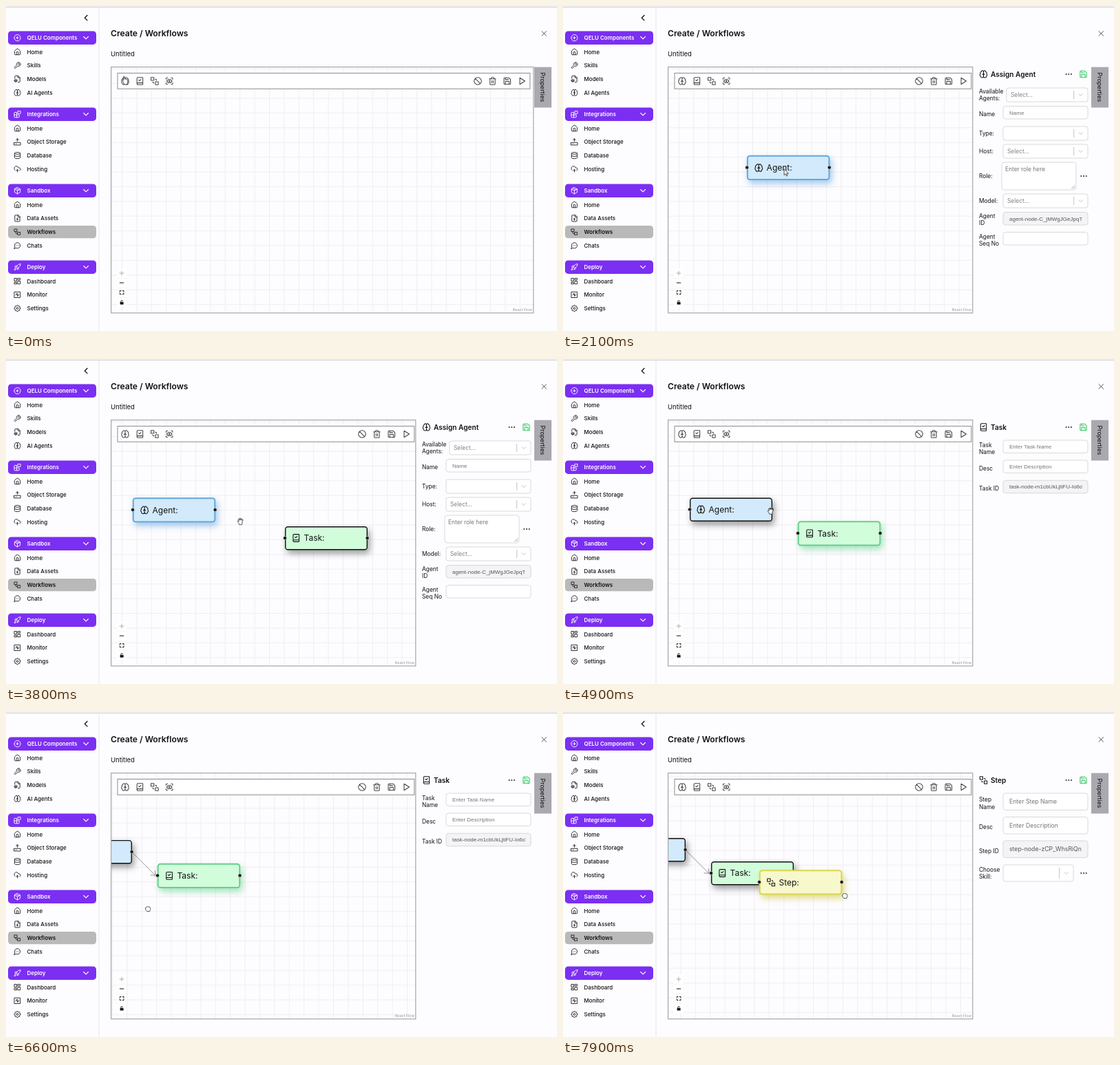
Write an HTML page that moves like this. It is 800 px wide and 472 px high and loops after 8000 ms.

```html
<!DOCTYPE html>
<html lang="en">
<head>
<meta charset="utf-8">
<title>Workflow editor</title>
<style>
html, body { margin: 0; width: 100%; height: 100%; overflow: hidden; background: #fdfcfe; }
svg { display: block; width: 100%; height: 100%; }
text { font-family: Inter, "Open Sans", sans-serif; font-size: 8px; fill: #111; white-space: pre; }
.arial { font-family: "Liberation Sans", Arial, sans-serif; }
.icon { fill: none; stroke-width: 2; stroke-linecap: round; stroke-linejoin: round; }
.field { fill: #fff; stroke: #d0d0d4; stroke-width: .8; }
.field.locked { fill: #f4f4f6; }
.thin { fill: none; stroke: #c4c4c8; stroke-width: 1; }
.cursor path { fill: #fff; stroke: #222; stroke-width: .8; stroke-linejoin: round; }
.edge { fill: none; stroke: #8a8a90; stroke-width: .9; }
.world, .cursor, .agentMove, .taskMove, .stepMove, .wire { animation: 8s ease-in-out infinite; }

.world { animation-name: pan; animation-timing-function: linear; }
@keyframes pan {
  0%, 75% { transform: translate(0, 0); }
  82.5% { transform: translate(-121px, -15.5px); }
  83.75%, 100% { transform: translate(-126px, -18.5px); }
}
.agentMove { animation-name: agentMove; }
@keyframes agentMove {
  0%, 21.25% { transform: translate(405px, 243px); }
  30%, 100% { transform: translate(184px, 201.5px); }
}
.taskMove { animation-name: taskMove; }
@keyframes taskMove {
  0%, 51.25% { transform: translate(405px, 243px); }
  56.25%, 100% { transform: translate(341px, 235.5px); }
}
.stepMove { animation-name: stepMove; }
@keyframes stepMove {
  0%, 97.5% { transform: translate(405px, 243px); }
  98.75%, 100% { transform: translate(411px, 248px); }
}
.wire { animation-name: wire; }
@keyframes wire {
  0%, 62.5% { d: path("M304 219L304 219"); }
  70%, 100% { d: path("M304 219L338 253"); }
}
.cursor { animation-name: cursor; }
@keyframes cursor {
  0%, 8.75% { transform: translate(173px, 108px); }
  18.75%, 21.25% { transform: translate(461px, 267px); }
  30%, 31.25% { transform: translate(240px, 225.5px); }
  35% { transform: translate(199px, 119px); }
  38.75% { transform: translate(199px, 119px); animation-timing-function: ease-in; }
  47.5% { transform: translate(340px, 236px); animation-timing-function: ease-out; }
  50%, 51.25% { transform: translate(432px, 262px); }
  56.25%, 57.5% { transform: translate(368px, 254.5px); }
  61.25%, 62.5% { transform: translate(302px, 221px); }
  70%, 71.25% { transform: translate(339px, 255px); }
  74.5% { transform: translate(327px, 301.5px); }
  75% { transform: translate(327px, 301.5px); animation-timing-function: linear; }
  82.5% { transform: translate(206px, 286px); animation-timing-function: linear; }
  83.75%, 84.5% { transform: translate(201px, 283px); }
  89%, 90.5% { transform: translate(218px, 114px); }
  96.25%, 97.5% { transform: translate(403px, 262px); }
  98.75%, 100% { transform: translate(409px, 267px); }
}
</style>
</head>
<body>
<svg id="stage" viewBox="0 0 800 472"></svg>
<script>
const LOOP = 8000;
const INK = '#222';

const box = (x, y, w, h = w) => `M${x} ${y}h${w}v${h}h${-w}z`;
const ring = (r, x = 12, y = 12) => `M${x - r} ${y}a${r} ${r} 0 1 0 ${2 * r} 0a${r} ${r} 0 1 0 ${-2 * r} 0`;
const gear = () => {
  const points = Array.from({ length: 32 }, (_, i) => {
    const r = i % 4 < 2 ? 10 : 7.6, a = (i - .5) * Math.PI / 16;
    return `${(12 + r * Math.cos(a)).toFixed(1)} ${(12 + r * Math.sin(a)).toFixed(1)}`;
  });
  return `M${points.join('L')}Z${ring(3)}`;
};

const ICONS = {
  plus: ring(10) + 'M8 12h8M12 8v8',
  home: 'M15 21v-8a1 1 0 0 0-1-1h-4a1 1 0 0 0-1 1v8M3 10a2 2 0 0 1 .7-1.5l7-6a2 2 0 0 1 2.6 0l7 6A2 2 0 0 1 21 10v9a2 2 0 0 1-2 2H5a2 2 0 0 1-2-2z',
  wrench: 'M14.7 6.3a1 1 0 0 0 0 1.4l1.6 1.6a1 1 0 0 0 1.4 0l3.8-3.8a6 6 0 0 1-8 8l-6.9 6.9a2.1 2.1 0 0 1-3-3l6.9-6.9a6 6 0 0 1 8-8z',
  model: 'M14 2v6h6M4 10V4a2 2 0 0 1 2-2h9l5 5v13a2 2 0 0 1-2 2h-4M3 15l4-2 4 2v4l-4 2-4-2zM3 15l4 2 4-2M7 17v4',
  brain: 'M12 5a3 3 0 1 0-6 .1 4 4 0 0 0-2.5 5.8 4 4 0 0 0 .5 6.6A4 4 0 1 0 12 18ZM12 5a3 3 0 1 1 6 .1 4 4 0 0 1 2.5 5.8 4 4 0 0 1-.5 6.6A4 4 0 1 1 12 18ZM15 13a4.5 4.5 0 0 1-3-4 4.5 4.5 0 0 1-3 4',
  blocks: 'M10 22V6H4a2 2 0 0 0-2 2v12a2 2 0 0 0 2 2h12a2 2 0 0 0 2-2v-6H2' + box(14, 2, 8),
  upload: 'M16 6l-4-4-4 4M12 2v8M6 18h.01M10 18h.01' + box(2, 14, 20, 8),
  database: 'M3 5a9 3 0 0 0 18 0a9 3 0 0 0-18 0v14a9 3 0 0 0 18 0V5M3 12a9 3 0 0 0 18 0',
  cloud: 'M12 13v8M4 14.9A7 7 0 1 1 15.7 8h1.8a4.5 4.5 0 0 1 2.5 8.2M8 17l4-4 4 4',
  cube: 'M12 2l9 5v10l-9 5-9-5V7zM3 7l9 5 9-5M12 22V12M7.5 4.5l9 5',
  file: 'M15 2H6a2 2 0 0 0-2 2v16a2 2 0 0 0 2 2h12a2 2 0 0 0 2-2V7ZM14 2v6h6M12 12v6M9 15l3-3 3 3',
  flow: box(3, 3, 8) + box(13, 13, 8) + 'M7 11v4a2 2 0 0 0 2 2h4',
  chat: 'M7.9 20A9 9 0 1 0 4 16.1L2 22ZM8 12h.01M12 12h.01M16 12h.01',
  rocket: 'M4.5 16.5c-1.5 1.3-2 5-2 5s3.7-.5 5-2a2 2 0 0 0-3-3zM12 15l-3-3a22 22 0 0 1 2-4A13 13 0 0 1 22 2c0 2.7-.8 7.5-6 11a22 22 0 0 1-4 2zM9 12H4s.5-3 2-4 5 0 5 0M12 15v5s3-.5 4-2 0-5 0-5',
  dashboard: box(3, 3, 7, 9) + box(14, 3, 7, 5) + box(14, 12, 7, 9) + box(3, 16, 7, 5),
  monitor: box(3, 3, 18) + 'M17 12h-2l-2 5-2-10-2 5H7',
  settings: gear(),
  task: 'M4 19.5v-15A2.5 2.5 0 0 1 6.5 2H19a1 1 0 0 1 1 1v18a1 1 0 0 1-1 1H6.5a1 1 0 0 1 0-5H20M9 9.5l2 2 4-4',
  step: box(2, 2, 8) + box(14, 14, 8) + 'M7 14v1a2 2 0 0 0 2 2h1M14 7h1a2 2 0 0 1 2 2v1',
  eye: 'M3 7V5a2 2 0 0 1 2-2h2M17 3h2a2 2 0 0 1 2 2v2M21 17v2a2 2 0 0 1-2 2h-2M7 21H5a2 2 0 0 1-2-2v-2M5 12a7.5 7.5 0 0 1 14 0a7.5 7.5 0 0 1-14 0' + ring(1.5),
  ban: ring(10) + 'M4.9 4.9l14.2 14.2',
  trash: 'M3 6h18M19 6v14a2 2 0 0 1-2 2H7a2 2 0 0 1-2-2V6M8 6V4a2 2 0 0 1 2-2h4a2 2 0 0 1 2 2v2M10 11v6M14 11v6',
  save: 'M16 3l5 5v11a2 2 0 0 1-2 2H5a2 2 0 0 1-2-2V5a2 2 0 0 1 2-2zM17 21v-8H7v8M7 3v5h8',
  play: 'M6 3l14 9-14 9z'
};

const CURSORS = {
  pointer: 'M-3 1.5l-1.6-1.2c-.8-.9.3-1.8 1.1-1.1l1 .8v-5c0-1.3 1.7-1.3 1.7 0v3.2c.4-.7 1.5-.6 1.6.2.5-.6 1.5-.4 1.6.4.6-.4 1.4 0 1.4.8v2.4c0 2-.8 2.4-1.1 4h-4.2c-.3-1.2-1-2.7-1.5-4.5z',
  grab: 'M-3.4 1.6l-1.2-1.8c-.4-1 .8-1.5 1.4-.7l.5.6-.7-3c-.1-1 1.1-1.2 1.4-.3l.4 1.2-.1-1.8c0-1 1.3-1 1.4 0l.2 1.8.4-1.6c.3-.9 1.4-.6 1.3.3l-.2 1.8.5-.8c.5-.8 1.5-.3 1.2.6l-1 3.4-.4 3h-3.9c-.2-1.2-.8-2-1.2-2.7z',
  arrow: 'M-2-4.5v9l2-1.8 1.5 3.2 1.4-.6-1.5-3.1h2.8z',
  fist: 'M-3.4-1c0-1.3 1-1.6 1.5-1.5.2-1 1.5-1.1 1.8-.4.4-.7 1.7-.6 1.9.3 1-.4 1.8.3 1.8 1.2v2c0 1.5-.8 1.8-1 3h-3.8c-.4-1.2-2.2-2-2.2-3.2z'
};

// Times in ms at which each class turns visible, hidden, visible ...
const SHOWN = {
  wide: [0, 1700], narrow: [1700],
  agent: [600, 1700, 4000], agentSel: [1700, 4000],
  task: [3100, 4000, 7800], taskSel: [4000, 7800],
  step: [7250, 7800], stepSel: [7800],
  agentPanel: [1700, 4000], taskPanel: [4000, 7800], stepPanel: [7800],
  link: [5000], tip: [5600],
  pointer: [0, 800, 2600, 3100, 7000, 7350],
  grab: [800, 1400, 2450, 2600, 3100, 3950, 4600, 6000, 6750, 7000, 7350, 7750],
  arrow: [1400, 2450, 3950, 4600],
  fist: [6000, 6750, 7750]
};
const showRules = Object.entries(SHOWN).map(([name, times]) => {
  const keys = times.map((t, i) => `${t / LOOP * 100}%{visibility:${i % 2 ? 'hidden' : 'visible'}}`);
  return `@keyframes ${name}{0%{visibility:hidden}${keys.join('')}}
    .${name}{visibility:hidden;animation:${name} ${LOOP}ms step-end infinite}`;
}).join('');

const icon = (name, x, y, scale = .46, color = INK) =>
  `<path class="icon" stroke="${color}" d="${ICONS[name]}" transform="translate(${x} ${y}) scale(${scale}) translate(-12 -12)"/>`;
const text = (x, y, str, size = 8, weight = 400, fill = '#111', more = '') =>
  `<text x="${x}" y="${y}" style="font-size:${size}px;font-weight:${weight};fill:${fill}" ${more}>${str}</text>`;
const rect = (x, y, x2, y2, attrs) =>
  `<rect x="${x}" y="${y}" width="${x2 - x}" height="${y2 - y}" ${attrs}/>`;
const line = (d, color, width = 1) =>
  `<path d="${d}" fill="none" stroke="${color}" stroke-width="${width}" stroke-linecap="round" stroke-linejoin="round"/>`;
const group = (cls, ...parts) => `<g class="${cls}">${parts.join('')}</g>`;

const MENU = [
  ['plus', 'QELU Components', ['home', 'Home'], ['wrench', 'Skills'], ['model', 'Models'], ['brain', 'AI Agents']],
  ['blocks', 'Integrations', ['home', 'Home'], ['upload', 'Object Storage'], ['database', 'Database'], ['cloud', 'Hosting']],
  ['cube', 'Sandbox', ['home', 'Home'], ['file', 'Data Assets'], ['flow', 'Workflows'], ['chat', 'Chats']],
  ['rocket', 'Deploy', ['dashboard', 'Dashboard'], ['monitor', 'Monitor'], ['settings', 'Settings']]
];
const sidebar = () => line('M135 2V472', '#e6e6ea') + line('M118 13.5l-3.7 3.7 3.7 3.7', '#111', 1.3) +
  MENU.map(([mark, title, ...items], n) => {
    const cy = 46.2 + 111 * n;
    const head = rect(3, cy - 9.7, 131, cy + 9.7, 'rx="4.5" fill="#7b2ff2"') + icon(mark, 16.5, cy, .46, '#fff') +
      text(30.5, cy + 2.9, title, 8, 600, '#fff') + line(`M112.7 ${cy - 1.7}l3.4 3.4 3.4-3.4`, '#fff', 1.1);
    return head + items.map(([name, label], i) => {
      const y = cy + 20.4 + 19.75 * i, on = label === 'Workflows';
      return (on ? rect(3, y - 9.2, 131, y + 9.2, 'rx="4.5" fill="#b9b9ba"') : '') +
        icon(name, 16.5, y) + text(30.5, y + 2.9, label, 8, on ? 600 : 500);
    }).join('');
  }).join('');

const node = (name, mark, label, fill, accent, glow) => {
  const face = (cls, stroke, width, h, shadow, shift) => group(cls,
    rect(.7, .7, 119.3, h, `rx="3.5" fill="${fill}" stroke="${stroke}" stroke-width="${width}" style="filter:drop-shadow(${shadow})"`),
    icon(mark, 16.2 + shift, 17 + shift, .54, '#111'), text(27.6 + shift, 21.3 + shift, label, 12),
    [0, 119.6].map(x => `<circle cx="${x}" cy="${17 + shift / 2}" r="2.5" fill="#111" stroke="#fff" stroke-width=".5"/>`).join(''));
  return group(name + 'Move',
    face(name, '#111', 1.4, 33.8, '3px 5px 5px rgba(0,0,0,.38)', 0),
    face(name + 'Sel', accent, 2, 35, `3px 5px 5px ${glow}`, .9));
};

const dots = (x, y) => [-3.7, 0, 3.7].map(d => `<circle cx="${x + d}" cy="${y}" r="1.05" fill="#333"/>`).join('');
const field = (y, y2, str = '', { x = 639, x2 = 762, locked, arial = true, size = 8 } = {}) =>
  rect(x, y, x2, y2, `rx="3.5" class="field${locked ? ' locked' : ''}"`) +
  text(648, (y + y2) / 2 + 2.9, str, size, 400, locked ? '#555' : '#757575', `clip-path="url(#fieldClip)" ${arial ? 'class="arial"' : ''}`);
const select = (y, y2, str = '', x = 639, x2 = 762) => {
  const cy = (y + y2) / 2;
  return rect(x, y, x2, y2, 'rx="3" class="field"') + text(x + 6, cy + 3, str, 8.4, 400, '#808080') +
    `<path class="thin" d="M${x2 - 20.3} ${y + 4}V${y2 - 4}M${x2 - 13.3} ${cy - 1.5}l3 3 3-3"/>`;
};
const label = (y, ...rows) => rows.map((row, i) => text(604, y + 10.4 * i, row, 8.4)).join('');
const panel = (name, mark, title, ...parts) => group(name + 'Panel',
  icon(mark, 610.5, 99, .52, '#111'), text(621, 102.6, title, 10.1, 600),
  dots(734.3, 99), icon('save', 755.5, 99, .52, '#35c964'), ...parts);

const panels = () =>
  panel('agent', 'brain', 'Assign Agent',
    label(126.6, 'Available', 'Agents:'), select(119, 139, 'Select...', 644),
    label(160, 'Name'), field(145.5, 164, 'Name'),
    label(188, 'Type:'), select(175, 195),
    label(214, 'Host:'), select(201, 221, 'Select...'),
    label(250, 'Role:'), rect(637, 227, 745, 267, 'rx="3.5" class="field"'),
    text(642, 240, 'Enter role here', 8.4, 400, '#757575'),
    line('M738.5 265l4.5-4.5M741 265l2-2', '#888', .7), dots(756, 247),
    label(286, 'Model:'), select(273, 293, 'Select...'),
    label(308, 'Agent', 'ID'), field(299.5, 318, 'agent-node-C_jMWgJGeJpqT', { locked: true }),
    label(337.6, 'Agent', 'Seq No'), field(328.5, 347)) +
  panel('task', 'task', 'Task',
    label(128, 'Task', 'Name'), field(118, 136.5, 'Enter Task Name'),
    label(161.6, 'Desc'), field(147, 165.5, 'Enter Description'),
    label(190.6, 'Task ID'), field(176.3, 194.8, 'task-node-m1cbUkLjtiFU-Io6d', { locked: true })) +
  panel('step', 'step', 'Step',
    label(130.3, 'Step', 'Name'), field(118, 142.5, 'Enter Step Name', { arial: false, size: 8.7 }),
    label(170, 'Desc'), field(152.5, 177, 'Enter Description', { arial: false, size: 8.7 }),
    label(205, 'Step ID'), field(187, 211.5, 'step-node-zCP_WhsRiQn', { locked: true, arial: false, size: 8.7 }),
    label(231.8, 'Choose', 'Skill:'), select(222, 246, '', 639, 741), dots(756, 234));

const frame = (cls, right, barRight) => group(cls,
  cls === 'narrow' ? rect(right, 86, 766.8, 448, 'fill="#fdfcfe"') : '',
  rect(152.6, 88.6, right, 445.8, 'fill="none" stroke="#a6a6aa" stroke-width="1.2"'),
  rect(162, 97.5, barRight, 120.3, 'fill="#fff" stroke="#8c8c90"'),
  ['brain', 'task', 'step', 'eye'].map((n, i) => icon(n, 173 + 21.4 * i, 109, .53, '#444')).join(''),
  ['ban', 'trash', 'save', 'play'].map((n, i) => icon(n, barRight - 75.8 + 21.4 * i, 109, .53, '#444')).join(''),
  text(right - 30, 443, 'React Flow', 5.4, 400, '#999'));

const controls = rect(161.5, 381, 175, 437.5, 'fill="#fff"') +
  line('M162 395.2h13M162 409.3h13M162 423.4h13', '#eee', .6) +
  line('M165 388h6M168 385v6', '#a5a5a5', .9) + line('M165.3 402h5.4', '#111', 1.2) +
  line('M165.3 415v-1.5h1.7M169.3 413.5h1.7v1.5M171 417v1.5h-1.7M167 418.5h-1.7v-1.5', '#111', 1) +
  rect(165.6, 430, 170.6, 433.6, 'rx=".6" fill="#111"') + line('M166.8 430v-1a1.3 1.3 0 0 1 2.6 0', '#111', .9);

document.getElementById('stage').innerHTML = `
<style>${showRules}</style>
<defs>
  <clipPath id="canvasClip"><rect x="153" y="89" width="613" height="356.5"/></clipPath>
  <clipPath id="fieldClip"><rect x="640" y="90" width="113.5" height="300"/></clipPath>
  <pattern id="grid" x="168" y="133.5" width="21.4" height="21.4" patternUnits="userSpaceOnUse">
    <path d="M0 .5H21.4M.5 0V21.4" stroke="#eeedf0" stroke-width=".9"/>
  </pattern>
</defs>
` + line('M0 1.5H800', '#c9c9cd') + sidebar() +
  text(152, 44.4, 'Create / Workflows', 12.1, 600) + text(152, 72.6, 'Untitled', 9.5) +
  line('M778 36.7l6.6 6.6M784.6 36.7l-6.6 6.6', '#444', .9) +
  '<g clip-path="url(#canvasClip)">' + group('world',
    rect(100, 40, 960, 520, 'fill="url(#grid)"'),
    group('link', '<path class="edge wire" d="M304 219L304 219"/>'),
    group('tip', '<path class="edge" d="M330.5 252.3L338 253L337.2 245.8"/>'),
    node('agent', 'brain', 'Agent:', '#d2eafb', '#62a9da', 'rgba(60,140,215,.45)'),
    node('task', 'task', 'Task:', '#d2fddb', '#66d08c', 'rgba(60,200,110,.45)'),
    node('step', 'step', 'Step:', '#f8f8cd', '#d9d554', 'rgba(200,195,40,.55)')) + '</g>' +
  frame('wide', 765.8, 760.8) + frame('narrow', 594.8, 592.8) + controls + panels() +
  rect(767, 88.7, 792, 147.5, 'fill="#aaa9b0"') +
  text(0, 0, 'Properties', 8.8, 400, '#111', 'text-anchor="middle" transform="translate(776.3 118) rotate(90)"') +
  group('cursor', ...Object.entries(CURSORS).map(([name, d]) => `<path class="${name}" d="${d}"/>`));
</script>
</body>
</html>
```
